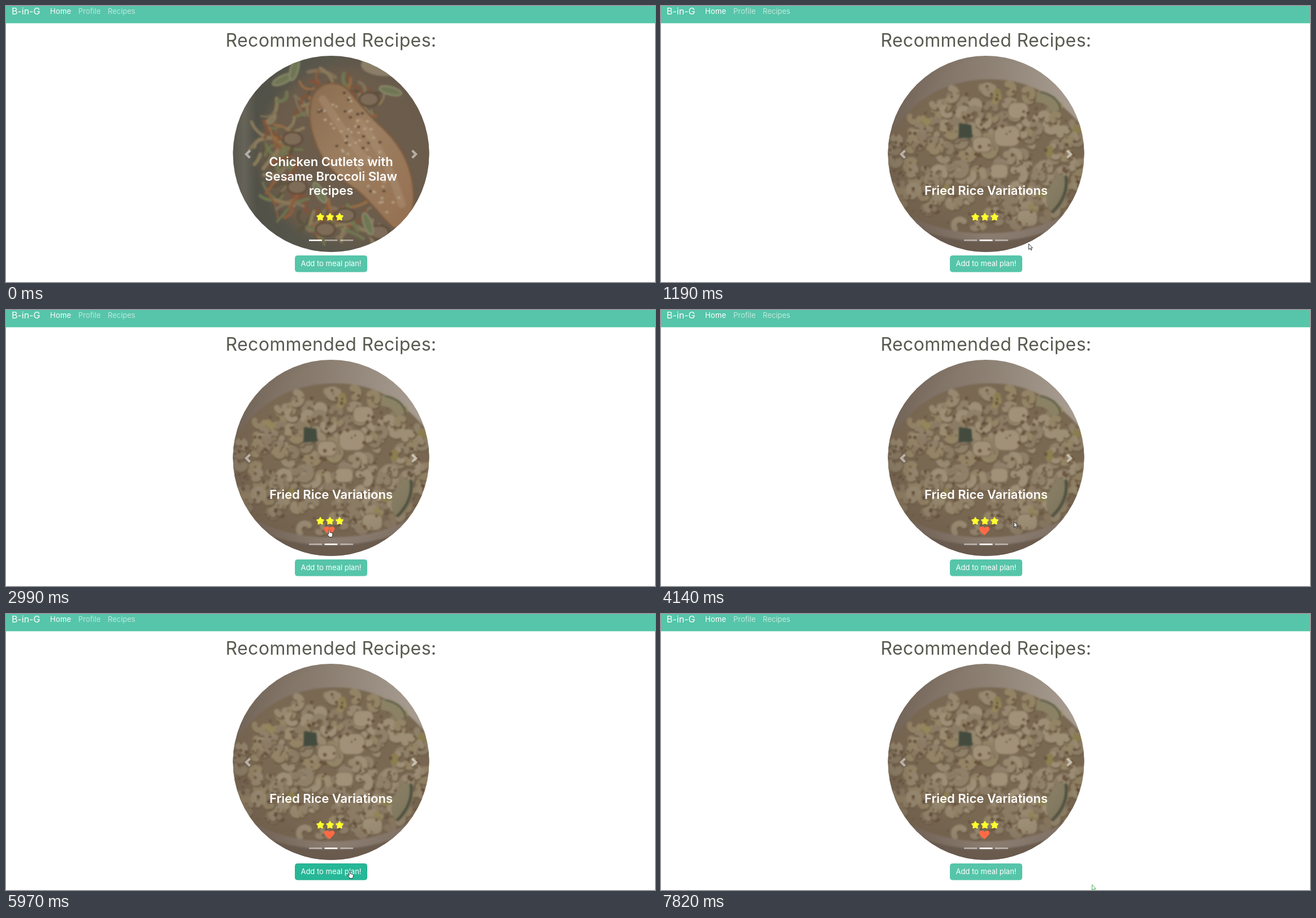
An HTML page that plays this animation: 1148 px wide and 488 px high, repeating every 8000 ms.

```html
<!DOCTYPE html>
<html lang="en">
<head>
<meta charset="utf-8">
<title>Recommended Recipes</title>
<style>
  html, body { margin: 0; width: 100%; height: 100%; overflow: hidden; background: #fff; }
  svg { display: block; }
  text { font-family: Inter, "Open Sans", sans-serif; font-size: 13px; fill: #fff; }
  .brand { font-size: 16px; }
  .muted { fill-opacity: .62; }
  .heading { font-size: 32px; letter-spacing: .35px; fill: #5a5a50; }
  .caption { font-size: 22px; font-weight: 600; }
  .heading, .caption, .label { text-anchor: middle; }
  .photo { filter: blur(1.4px); }
  .soft { filter: blur(9px); }
</style>
</head>
<body>
<svg width="1148" height="488" viewBox="0 0 1148 488">
  <defs>
    <clipPath id="disc"><circle cx="575" cy="261.5" r="173.5"/></clipPath>
    <linearGradient id="bowl" x2="1" y2=".1">
      <stop stop-color="#75675a"/><stop offset=".5" stop-color="#8c8073"/><stop offset="1" stop-color="#aaa093"/>
    </linearGradient>
    <linearGradient id="rim">
      <stop stop-color="#736456"/><stop offset=".5" stop-color="#94867a"/><stop offset="1" stop-color="#85776a"/>
    </linearGradient>
    <linearGradient id="plate">
      <stop stop-color="#57564d"/><stop offset=".06" stop-color="#67655b"/>
      <stop offset=".12" stop-color="#4c4e46"/><stop offset=".5" stop-color="#58564b"/><stop offset="1" stop-color="#6d5b4b"/>
    </linearGradient>
    <linearGradient id="meat" x2="1" y2="1">
      <stop stop-color="#96704f"/><stop offset=".45" stop-color="#ad8866"/><stop offset="1" stop-color="#a27450"/>
    </linearGradient>
    <radialGradient id="shade" cx=".55" cy=".4" r=".65">
      <stop offset=".6" stop-color="#54463a" stop-opacity="0"/><stop offset="1" stop-color="#54463a" stop-opacity=".3"/>
    </radialGradient>
    <path id="arrow" d="M.5.5v10l2.3-2.2 1.7 3.5 1.5-.7-1.6-3.3h2.9z" stroke-width=".9" stroke-linejoin="round"/>
    <path id="hand" d="M3 1.3q1.1-1.6 2.3 0v4l3.7.9q1.7.5 1.5 2.1l-.6 3q-.4 1-.9 2.2h-5q-.5-1.5-1.8-2.9l-1.7-2.7q.6-1.4 1.9-.3l.6.8z" stroke-width=".9" stroke-linejoin="round"/>
  </defs>

  <rect width="1148" height="30.5" fill="#56c5a9"/>
  <text class="brand" x="10" y="14.5">B-in-G</text>
  <text x="78" y="13.5" letter-spacing=".25">Home</text>
  <text class="muted" x="128" y="13.5">Profile</text>
  <text class="muted" x="180" y="13.5">Recipes</text>
  <text class="heading" x="575" y="71.5">Recommended Recipes:</text>

  <g id="carousel">
    <g id="chicken" clip-path="url(#disc)">
      <rect x="401" y="88" width="348" height="348" fill="url(#plate)"/>
      <ellipse class="soft" cx="600" cy="262" rx="150" ry="155" fill="#6d5b49"/>
      <g class="photo">
        <ellipse cx="672" cy="104" rx="44" ry="20" fill="#978871"/>
        <g id="slaw"></g>
        <path d="M540 165C552 130 590 130 607 150C625 172 640 190 655 205C690 235 715 270 720 320C725 360 715 385 690 395C672 385 650 350 620 325C580 300 555 270 545 235C536 210 535 190 540 165Z" fill="url(#meat)" stroke="#805a3e" stroke-width="3"/>
        <path d="M560 165C585 200 605 240 640 275M625 205C655 240 680 285 700 350" fill="none" stroke="#bd9a79" stroke-width="14" stroke-linecap="round" opacity=".55"/>
        <g id="sesame"></g>
      </g>
      <rect x="401" y="88" width="348" height="348" fill="#666055" opacity=".22"/>
    </g>
    <g id="pasta" clip-path="url(#disc)">
      <rect x="401" y="88" width="348" height="348" fill="url(#bowl)"/>
      <g class="photo">
        <path d="M395 245C450 145 530 128 590 130S700 155 755 225V345Q690 405 575 405T395 345Z" fill="#796852"/>
        <g id="macaroni"></g>
        <path d="M527 207l22 3 2 23-25 1z" fill="#434b3e"/>
        <path d="M664 160q30 5 36 25" fill="none" stroke="#8b8265" stroke-width="18"/>
        <path d="M671 152q33 7 36 32" fill="none" stroke="#5a5c44" stroke-width="3"/>
        <ellipse cx="701" cy="331" rx="17" ry="34" transform="rotate(18 701 331)" fill="#867d63"/>
        <path d="M716 300q6 35-24 65" fill="none" stroke="#4d523f" stroke-width="5"/>
        <path d="M395 338Q460 402 575 402T755 338V436H395Z" fill="#6f6053"/>
        <path d="M400 350Q465 409 575 409T750 350" fill="none" stroke="url(#rim)" stroke-width="14"/>
      </g>
      <rect x="401" y="88" width="348" height="348" fill="url(#shade)"/>
    </g>
    <g fill="#fff" fill-opacity=".5">
      <path d="M430 254l3 3-5 5 5 5-3 3-8-8z"/>
      <path d="M720 254l8 8-8 8-3-3 5-5-5-5z"/>
    </g>
    <g id="chickenCaption">
      <text class="caption" x="575" y="283">Chicken Cutlets with</text>
      <text class="caption" x="575" y="308.5">Sesame Broccoli Slaw</text>
      <text class="caption" x="575" y="334">recipes</text>
    </g>
    <text id="pastaCaption" class="caption" x="575" y="334">Fried Rice Variations</text>
    <g id="stars" fill="#ffff2e" stroke-linejoin="round"></g>
    <path id="heart" transform="translate(572 383)" fill="#ff6a45" d="M0 15.5L-7.6 7.7C-11 4-9 0-5 0C-2.8 0-1 1 0 2.5C1 1 2.8 0 5 0C9 0 11 4 7.6 7.7Z"/>
  </g>
  <g id="indicators" fill="#fff"></g>

  <rect id="button" x="511.5" y="441.5" width="127" height="28.5" rx="4"/>
  <text class="label" x="575" y="460">Add to meal plan!</text>
  <use id="cursor"/>
</svg>
<script>
const LOOP = 8000;
const $ = id => document.getElementById(id);

function add(parent, tag, attrs) {
  const node = document.createElementNS("http://www.w3.org/2000/svg", tag);
  for (const key in attrs) node.setAttribute(key, attrs[key]);
  return $(parent).appendChild(node);
}

let seed = 11;
function random(min = 0, max = 1) {
  seed = (seed * 16807) % 2147483647;
  return min + (max - min) * seed / 2147483647;
}
const pick = list => list[Math.floor(random() * list.length)];

function drawSlaw() {
  const colors = ["#985d38", "#a06f43", "#88775a", "#737c50", "#8d4f31", "#94835f", "#5a5039"];
  for (let i = 0; i < 120; i++) {
    const angle = random(1.1, 5.4), radius = random(85, 148);
    const x = 590 + radius * Math.cos(angle), y = 265 + radius * Math.sin(angle);
    const turn = random(0, 360), half = random(9, 25), bend = random(-16, 16);
    add("slaw", "path", {
      d: `M${-half} 0Q0 ${bend} ${half} 0`, fill: "none", stroke: pick(colors),
      "stroke-width": random(3, 7), "stroke-linecap": "round",
      transform: `translate(${x} ${y}) rotate(${turn})`
    });
  }
  const mushrooms = [[507, 235], [515, 320], [565, 395], [642, 165], [600, 370], [660, 400]];
  for (const [cx, cy] of mushrooms)
    add("slaw", "ellipse", { cx, cy, rx: 17, ry: 12, fill: "#86705a", stroke: "#5b4535", "stroke-width": 3 });
  const onions = [[490, 130, -25], [510, 112, -75], [680, 150, 15], [555, 330, 60], [640, 385, 70]];
  for (const [x, y, turn] of onions)
    add("slaw", "ellipse", {
      rx: 20, ry: 7, fill: "#747d55", stroke: "#929372", "stroke-width": 3,
      transform: `translate(${x} ${y}) rotate(${turn})`
    });
  for (let i = 0; i < 75; i++) {
    const along = random(), across = random(-30, 30);
    add("sesame", "ellipse", {
      cx: 575 + 115 * along + across, cy: 165 + 190 * along - across * .6,
      rx: 2.6, ry: 1.8, fill: pick(["#d5c2a2", "#d5c2a2", "#3e2c1f"])
    });
  }
}

function drawMacaroni() {
  const pale = ["#978870", "#8f806a", "#9d8e76", "#8b7b64", "#948466"];
  const place = () => {
    const x = random(405, 745);
    const top = 138 + 95 * ((x - 590) / 180) ** 2;
    const bottom = 396 - 60 * ((x - 575) / 175) ** 2;
    return [x, random(top, bottom)];
  };
  for (let i = 0; i < 190; i++) {
    const [x, y] = place(), size = random(6, 11);
    const shape = {
      d: `M${-size} 0A${size} ${size} 0 0 1 ${size} 0`, fill: "none", "stroke-linecap": "round"
    };
    const turn = random(0, 360), width = random(9, 14);
    add("macaroni", "path", { ...shape, stroke: "#6b5a44", "stroke-width": width + 1,
      transform: `translate(${x + 1} ${y + 2}) rotate(${turn})` });
    add("macaroni", "path", { ...shape, stroke: pick(pale), "stroke-width": width,
      transform: `translate(${x} ${y}) rotate(${turn})` });
  }
  for (let i = 0; i < 14; i++) {
    const [x, y] = place();
    add("macaroni", "rect", { x: -10, y: -6, width: 20, height: 12, rx: 4,
      fill: pick(["#8b7f50", "#93865a", "#9a8c70"]),
      transform: `translate(${x} ${y}) rotate(${random(0, 180)})` });
  }
  const chunks = [[612, 230, 23], [568, 245, 17], [632, 185, 18], [648, 375, 18], [598, 292, 16]];
  for (const [x, y, size] of chunks)
    add("macaroni", "rect", { x: x - size, y: y - size * .8, width: size * 2, height: size * 1.6,
      rx: size * .6, fill: "#a09178", stroke: "#7b6a54", "stroke-width": 1.5 });
  for (let i = 0; i < 190; i++) {
    const [cx, cy] = place();
    add("macaroni", "circle", { cx, cy, r: random(1.4, 3.2), fill: pick(["#5e4936", "#66503a", "#6b553f"]) });
  }
}

function drawStars() {
  for (const cx of [556, 573, 590]) {
    const points = Array.from({ length: 10 }, (_, i) => {
      const angle = (i / 5 - .5) * Math.PI, radius = i % 2 ? 3.6 : 6.5;
      return [cx + radius * Math.cos(angle), 373.3 + radius * Math.sin(angle)];
    });
    add("stars", "polygon", { points: points.join(" "), "stroke-width": 1.6 });
  }
}

drawSlaw();
drawMacaroni();
drawStars();
const indicators = [536, 563.5, 591].map(x =>
  add("indicators", "rect", { x, y: 413, width: 23, height: 2.5 }));

// Pointer samples: start time, shape, x, y
const pointer = [
  [500, "arrow", 685, 441], [1190, "arrow", 650, 420], [1670, "arrow", 588, 406],
  [2010, "arrow", 571, 391], [2550, "hand", 567.5, 388], [3780, "arrow", 585, 380],
  [4140, "arrow", 624, 374], [4610, "arrow", 655, 384], [4940, "arrow", 661, 414],
  [5470, "hand", 604, 454], [7460, "arrow", 678, 455], [7820, "arrow", 762, 478]
];

const show = (id, visible) => $(id).style.display = visible ? "" : "none";
const set = (id, attrs) => { for (const key in attrs) $(id).setAttribute(key, attrs[key]); };

function render(time) {
  const second = time >= 500, settling = second && time < 850;
  show("chicken", !second);
  show("chickenCaption", !second);
  show("pasta", second);
  show("pastaCaption", second);
  show("heart", time >= 2990);
  set("carousel", { transform: `translate(${settling ? .6 : 0} 0)` });
  set("stars", { stroke: settling ? "#f3efcf" : "#ffff2e" });
  indicators.forEach((bar, i) => bar.setAttribute("fill-opacity", i === +second ? 1 : .5));

  const hovered = time >= 5970 && time < 7820;
  set("button", { fill: hovered ? "#27b797" : "#56c5a9", stroke: hovered ? "#22ab8d" : "#56c5a9" });

  const sample = pointer.findLast(([start]) => time >= start);
  show("cursor", sample);
  if (sample) {
    const [start, shape, x, y] = sample;
    set("cursor", { href: "#" + shape, x, y, fill: "#fff", stroke: start === 7820 ? "#3da54b" : "#222" });
  }
}

function tick(now) {
  render(now % LOOP);
  requestAnimationFrame(tick);
}
render(0);
requestAnimationFrame(tick);
</script>
</body>
</html>
```
